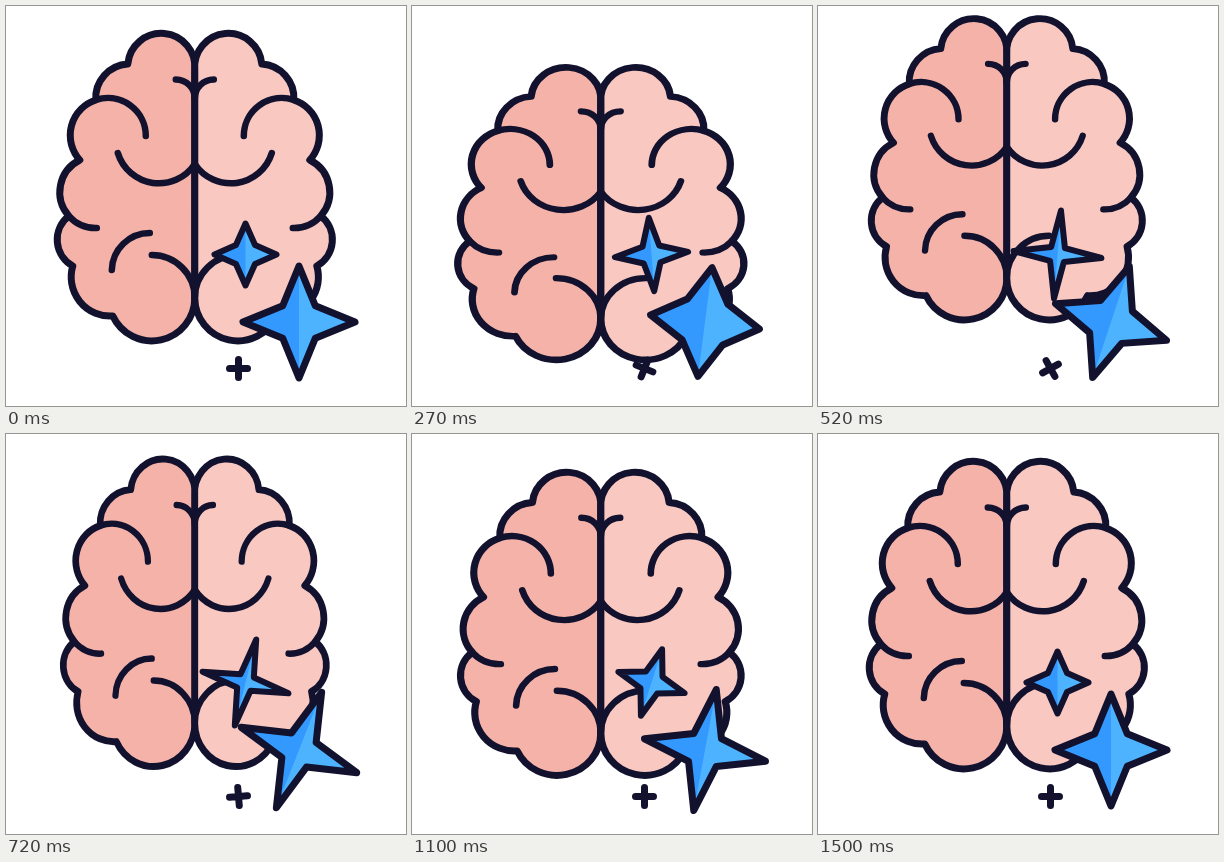
These frames come from a looping animation (400 by 400 pixels, 1.52 s). An HTML page with a canvas:

```html
<!DOCTYPE html>
<html lang="en">
<head>
<meta charset="utf-8">
<title>Brain with sparkles</title>
<style>
  html, body { margin: 0; height: 100%; overflow: hidden; background: #fff; }
  canvas { display: block; width: 100vw; height: 100vh; }
</style>
</head>
<body>
<canvas></canvas>
<script>
const LOOP = 1520, END = 1500;
const canvas = document.querySelector('canvas');
const ctx = canvas.getContext('2d');
const dpr = window.devicePixelRatio || 1;
canvas.width = canvas.height = 400 * dpr;

// Left half of the brain; the right half is its mirror image.
const lobes = new Path2D(`M189 64A33 33 0 0 0 122 58A34 34 0 0 0 90 94
  A37 37 0 0 0 74 154A36 36 0 0 0 63 210A30 30 0 0 0 67 260
  A39 39 0 0 0 107 310A43 43 0 0 0 189 292Z`);
const folds = new Path2D(`M90 94A38 38 0 0 1 140 130M63 210A36 36 0 0 0 91 222
  M189 292A43 43 0 0 0 146 249M112 147A43 43 0 0 0 189 158
  M170 73.5A19 19 0 0 1 189 92.5`);
const leftFold = new Path2D('M106 264A38 38 0 0 1 144 227');
const plus = new Path2D('M-9 0H9M0-9V9');

// Swings from rest to each [time, value] turning point and back to rest.
function swing(rest, turns, end = END) {
  const keys = [[0, rest], ...turns, [end, rest]];
  return t => {
    const next = keys.findIndex(key => key[0] > t);
    if (next < 0) return rest;
    const [t0, a] = keys[next - 1], [t1, b] = keys[next];
    return a + (b - a) * smooth((t - t0) / (t1 - t0));
  };
}

function smooth(u) {
  u = Math.min(u, 1);
  return u * u * (3 - 2 * u);
}

const brain = {
  y: swing(181.5, [[270, 208], [530, 163.5], [900, 193.3]]),
  sx: swing(1, [[270, 1.04], [690, 0.955], [1080, 1.02]]),
  sy: swing(1, [[270, 0.951], [720, 1], [1000, 0.984]])
};
const smallStar = {
  x: 239.5, y: 248.5, line: 6,
  angle: swing(0, [[200, -4.8], [980, 20.5]]),
  outer: swing(31, [[620, 45]], 1350),
  inner: swing(13.5, [[620, 9.5]], 1350)
};
const bigStar = {
  x: 293, y: 316, line: 7,
  angle: swing(0, [[690, 21.5]]),
  outer: swing(56, [[200, 54.6], [900, 63.5]]),
  inner: swing(23, [[270, 29], [800, 18]])
};

function at(x, y, degrees, draw) {
  ctx.save();
  ctx.translate(x, y);
  ctx.rotate(degrees * Math.PI / 180);
  draw();
  ctx.restore();
}

function fill(path, color) {
  ctx.fillStyle = color;
  ctx.fill(path);
}

function stroke(path, width) {
  ctx.lineWidth = width;
  ctx.stroke(path);
}

function drawHalf(color) {
  fill(lobes, color);
  stroke(lobes, 7);
  stroke(folds, 6.5);
}

function drawBrain(t) {
  ctx.save();
  ctx.translate(188.8, brain.y(t));
  ctx.scale(brain.sx(t), brain.sy(t));
  ctx.translate(-189, -181.5);
  drawHalf('#f5b2a8');
  stroke(leftFold, 6.5);
  ctx.transform(-1, 0, 0, 1, 378, 0);
  drawHalf('#f8c8c1');
  ctx.restore();
}

function drawStar(star, t) {
  const R = star.outer(t), k = star.inner(t) * Math.SQRT1_2;
  const left = `M0 ${-R}L${-k} ${-k} ${-R} 0 ${-k} ${k} 0 ${R}`;
  const outline = new Path2D(`${left}L${k} ${k} ${R} 0 ${k} ${-k}Z`);
  at(star.x, star.y, star.angle(t), () => {
    fill(outline, '#4db3ff');
    fill(new Path2D(left), '#3399ff');
    stroke(outline, star.line);
  });
}

function render() {
  const t = performance.now() % LOOP;
  ctx.setTransform(dpr, 0, 0, dpr, 0, 0);
  ctx.fillStyle = '#fff';
  ctx.fillRect(0, 0, 400, 400);
  ctx.strokeStyle = '#12122f';
  ctx.lineCap = ctx.lineJoin = 'round';
  drawBrain(t);
  at(232.5, 362.5, 90 * smooth(t / 840), () => stroke(plus, 7));
  drawStar(smallStar, t);
  drawStar(bigStar, t);
  requestAnimationFrame(render);
}
render();
</script>
</body>
</html>
```
